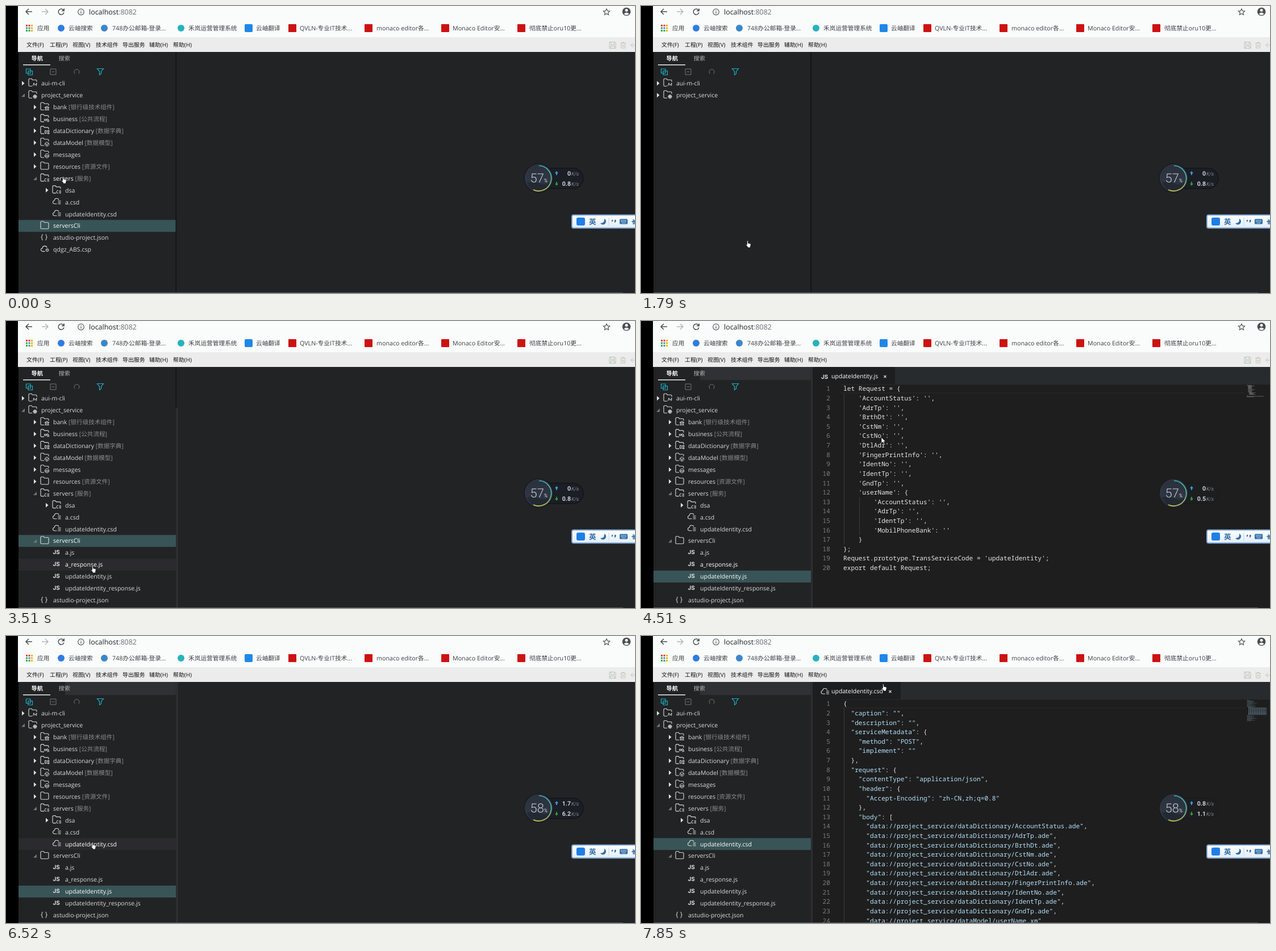
Write an HTML page that moves like this. It is 1107x506 px and loops after 8000 ms.

```html
<!DOCTYPE html>
<html lang="zh">
<head>
<meta charset="utf-8">
<style>
html,body{margin:0;width:100%;height:100%;overflow:hidden;background:#000}
svg{display:block;width:1107px;height:506px}
text{font-family:"Open Sans","Noto Sans CJK SC","Noto Sans CJK",sans-serif;white-space:pre;text-rendering:geometricPrecision}
.code{font-family:"Noto Sans Mono",monospace;font-weight:500}
.num{font-family:Roboto,sans-serif}
.js{font-family:Inter,sans-serif;font-weight:700}
</style>
</head>
<body>
<svg viewBox="0 0 1107 506">
<defs>
<linearGradient id="arc" x1="0" y1="0" x2="0" y2="1"><stop offset="0" stop-color="#3fb6c0"/><stop offset=".55" stop-color="#5fb89a"/><stop offset="1" stop-color="#c9c24e"/></linearGradient>
<linearGradient id="dial" x1="0" y1="0" x2="0" y2="1"><stop offset="0" stop-color="#2a313c"/><stop offset=".6" stop-color="#2e3643"/><stop offset="1" stop-color="#22272f"/></linearGradient>
<linearGradient id="ime" x1="0" y1="0" x2="0" y2="1"><stop offset="0" stop-color="#fff"/><stop offset="1" stop-color="#e3edf8"/></linearGradient>
</defs>
<g id="back"></g><g id="live"></g>
</svg>
<script>
const LOOP = 8000, TEAL = '#1bb3c4';
const $ = id => document.getElementById(id);
const rect = (x, y, w, h, fill, more = '') => `<rect x="${x}" y="${y}" width="${w}" height="${h}" fill="${fill}" ${more}/>`;
const text = (x, mid, s, size, fill, more = '') =>
  `<text x="${x}" y="${mid + size * .36}" font-size="${size}" fill="${fill}" ${more}>${s}</text>`;
const line = (d, color, w = 1, x = 0, y = 0, more = '') =>
  `<path d="${d}" transform="translate(${x} ${y})" fill="none" stroke="${color}" stroke-width="${w}" ${more}/>`;
const shape = (d, fill, x = 0, y = 0, more = '') => `<path d="${d}" transform="translate(${x} ${y})" fill="${fill}" ${more}/>`;
const circle = (x, y, r, fill, more = '') => `<circle cx="${x}" cy="${y}" r="${r}" fill="${fill}" ${more}/>`;
const at = (list, t) => list.filter(k => k[0] <= t).pop();

// Browser frame, menu bar and navigator header
function backdrop() {
  let s = rect(21, 0, 1086, 55, '#fafbfb') + rect(21, 55, 1086, 26, '#ececec') + rect(22, 81, 1085, 425, '#222325');
  s += line('M11 0H0M5-5L0 0L5 5', '#4a4d51', 1.5, 35, 10) + line('M0 0H11M6-5L11 0L6 5', '#b5b8bb', 1.5, 63, 10);
  s += line('M4.6-2.6A5 5 0 1 0 5 1M5.2-6V-2H1', '#4a4d51', 1.5, 97, 10.5);
  s += circle(132, 10.5, 5.3, 'none', 'stroke="#5f6368" stroke-width="1.2"') + line('M132 9.8V13.6M132 7.4V8.7', '#5f6368', 1.3);
  s += text(146, 10.5, 'localhost<tspan fill="#6a6e73">:8082</tspan>', 12.45, '#202124');
  s += line('M0-5.5L1.7-1.9L5.6-1.5L2.7 1.2L3.5 5L0 3L-3.5 5L-2.7 1.2L-5.6-1.5L-1.7-1.9Z', '#55585c', 1.2, 1057, 10.5);
  s += circle(1092, 10, 7.3, '#4a4d51') + circle(1092, 7.6, 2.5, '#fafbfb') + shape('M-4.6 4Q0-1 4.6 4Q0 8 -4.6 4Z', '#fafbfb', 1092, 10);
  const dots = ['#e34133', '#e34133', '#f0b400', '#34a853', '#4285f4', '#f0b400', '#34a853', '#34a853', '#f0b400'];
  dots.forEach((c, i) => s += rect(35 + i % 3 * 4.5, 33 + (i / 3 | 0) * 4.5, 3, 3, c));
  s += circle(97, 39, 6, '#2f7de0') + circle(173, 39, 6, '#3b86c8') + circle(308, 39, 6, '#27b2bd') + rect(420, 32, 14, 14, '#1f87e8', 'rx="2"');
  [497, 631, 766, 900].forEach(x => s += rect(x, 32, 14, 14, '#cc1212', 'rx="1"'));
  [[55, '应用'], [110, '云岫搜索'], [187, '748办公邮箱-登录...'], [321, '禾岚运营管理系统'], [440, '云岫翻译'], [517, 'QVLN-专业IT技术...'],
   [652, 'monaco editor各...'], [786, 'Monaco Editor安...'], [921, '彻底禁止oru10更...']].forEach(([x, n]) => s += text(x, 39, n, 10.7, '#3c4043'));
  [[36, '文件(F)'], [77, '工程(P)'], [117, '视图(V)'], [158, '技术组件'], [205, '导出服务'], [252, '辅助(H)'], [294, '帮助(H)']]
    .forEach(([x, n]) => s += text(x, 68, n, 9.9, '#111'));
  s += line('M-5.5-5.5H4L5.5-4V5.5H-5.5ZM-3-5V-1H3V-5M-3.5 5V1.5H3.5V5', '#b9c3b8', 1, 1067.5, 69);
  s += line('M-4.5-3.5H4.5M-1.5-3.5V-5H1.5V-3.5M-3.5-3.5V5H3.5V-3.5M-1-1V3M1-1V3', '#c9c3b8', 1, 1086, 69);
  s += line('M4-4L0 0L4 4M0 0H9', '#c4c4c4', 1, 1099.5, 69);
  return s;
}

function header(wide) {
  return (wide ? rect(104, 81, 195, 23, '#2f3134') : '')
    + text(44.5, 92, '导航', 10.2, '#fff', 'font-weight="600"') + text(92.5, 92, '搜索', 10.2, '#b4b4b4') + rect(30, 103, 48, 1.5, '#eee')
    + line('M-5.5-5H2V2.500H-5.500ZM-2-1.500H5.500V5.500H-2Z', TEAL, 1.2, 41, 116)
    + line('M-5-5H5V5H-5ZM-2.500 0H2.500', '#777', 1, 83, 116) + line('M-3 3.500A4.500 4.500 0 1 1 3 3.500', '#777', 1, 124.5, 116)
    + line('M-5.500-5.500H5.500L1.500-.5V3.500L-1.500 5.500V-.5Z', TEAL, 1.2, 166, 116);
}

// Small drawings laid over the corner of tree folders
const badges = {
  M: 'M8 13L9.500 8L11.500 12L14.500 8L14 13',
  gear: 'M9 11a2.500 2.500 0 1 0 5 0a2.500 2.500 0 1 0-5 0M11.500 7V15M7.500 11H15.500M8.700 8.200L14.300 13.800M14.300 8.200L8.700 13.800',
  bank: 'M7.500 9.500L11.500 7L15.500 9.500ZM9 10V13M11.500 10V13M14 10V13M7.500 13.500H15.500',
  flow: 'M7 9H10V11.500H7ZM12.500 8a1.500 1.500 0 1 0 .1 0M10 10.500H15M11.500 13H15V11',
  dict: 'M8 8H10.500V13H8ZM12.500 8H15.500V10H12.500ZM12.500 12H15.500V13.500H12.500Z',
  model: 'M11.500 7.500a3.500 3.500 0 1 0 .1 0M8.500 10L11.500 11.500L14.500 9.500M11.500 11.500V14',
  globe: 'M11.500 7a3.600 3.600 0 1 0 .1 0M8 10.500H15M9 13Q11.500 9 14 13',
  cloud: 'M10.500 13.500H8.500Q6.500 13 7.500 11Q8 8.500 10.500 9M12 9.500H15.500M12 11.500H15.500M12 13.500H15.500'
};
const FOLDER = 'M6.500 13.500H2Q.5 13.500.5 12V2Q.5.5 2 .5H5.500L7 2.500H13Q14.500 2.500 14.500 4V6';
const CLOUD = 'M8 11.500H4Q.5 11 1 8Q1.500 6 3.500 6Q4 2 7.500 2Q11 2 11.500 4.500M10 6.500H15M10 9H15M10 11.500H15';
function icon(kind, x, y) {
  const c = '#dcdcdc';
  if (kind == 'js') return text(x + 1, y + 7, 'JS', 10, c, 'class="js"');
  if (kind == 'json') return text(x + .5, y + 6.5, '{ }', 12, c);
  if (kind == 'csd') return line(CLOUD, c, 1.1, x, y);
  if (kind == 'csp') return line('M8 11.500H4Q.5 11 1 8Q1.500 6 3.500 6Q4 2 7.500 2Q11 2 11.500 5M12 7a2.300 2.300 0 1 0 .1 0M12 8.500V10', c, 1.1, x, y);
  if (kind == 'folder') return line('M.5 12V2Q.5.5 2 .5H5.500L7 2.500H13Q14.500 2.500 14.500 4V12Q14.500 13.500 13 13.500H2Q.5 13.500.5 12Z', c, 1.1, x, y);
  return line(FOLDER, c, 1.1, x, y) + line(badges[kind], c, 1, x, y);
}

// Rows: depth, icon, name, note, arrow (0 none, 1 closed, 2 open)
function rows(open, cli) {
  const list = [[0, 'M', 'aui-m-cli', '', 1], [0, 'gear', 'project_service', '', open ? 2 : 1]];
  if (!open) return list;
  list.push([1, 'bank', 'bank', '银行级技术组件', 1], [1, 'flow', 'business', '公共流程', 1], [1, 'dict', 'dataDictionary', '数据字典', 1],
    [1, 'model', 'dataModel', '数据模型', 1], [1, 'globe', 'messages', '', 1], [1, 'folder', 'resources', '资源文件', 1],
    [1, 'cloud', 'servers', '服务', 2], [2, 'cloud', 'dsa', '', 1], [2, 'csd', 'a.csd', '', 0], [2, 'csd', 'updateIdentity.csd', '', 0],
    [1, 'folder', 'serversCli', '', cli ? 2 : 0]);
  if (cli) ['a', 'a_response', 'updateIdentity', 'updateIdentity_response'].forEach(n => list.push([2, 'js', n + '.js', '', 0]));
  list.push([1, 'json', 'astudio-project.json', '', 0], [1, 'csp', 'qdgz_ABS.csp', '', 0]);
  return list;
}
function tree(t, picked, hover) {
  return rows(t < 1790 || t >= 2030, t >= 3240).map(([depth, kind, name, note, arrow], i) => {
    const y = 136.3 + i * 20.95, x = 21 * depth, on = name == picked;
    const lit = on || i == hover || name == 'a_response.js' && t >= 3510 && t < 5600;
    return (on ? rect(22, y - 10.5, 277, 21, '#385456') : i == hover && t > 1790 ? rect(22, y - 10.5, 277, 21, '#2b2b2f') : '')
      + (arrow == 1 ? shape('M0-4L4.500 0L0 4Z', '#e0e0e0', x + 28, y) : arrow ? shape('M0 3H6V-3Z', '#777', x + 27, y) : '')
      + icon(kind, x + 39.5, y - 8.5)
      + text(x + 62, y, name + (note && `<tspan fill="#8b8b8b"> [${note}]</tspan>`), 10.55, lit ? '#fff' : '#dadada');
  }).join('');
}

// Context menu: middle, label, icon, rule below
const UP = 'M-4 4H-5Q-8 4-8 1Q-8-2-5-2Q-4-7 0-7Q5-7 5-2Q8-2 8 1Q8 4 5 4H4M0 8V0M-3 3L0 0L3 3';
const items = [
  [219, '新建服务文件', 'M-7-7H0V0H-7ZM3-6H7M3-1H7M-7 3H7M-7 7H7', 1],
  [248, '新建服务', 'M-4 4H-5Q-8 4-8 1Q-8-2-5-2Q-4-7 0-7Q5-7 5-2Q8-2 8 1Q8 4 5 4M-4 0H4V3H-4ZM-4 4H4V7H-4Z', 1],
  [277, '新建文件夹', 'M-8 7V-7H-2L0-5H8V7ZM0-2V4M-3 1H3', 1],
  [306, '复制', 'M-7-4H4V7H-7ZM-4-4V-7H7V4H4M-4 0H1M-4 3H1', 0],
  [335, '粘贴', 'M-3 6H-7V-6H5V-3M-3-8H2V-4H-3ZM-2-1H4L7 2V8H-2ZM0 3H4M0 5.500H4', 0],
  [362, '在文件夹中搜索', 'M-1-7a6 6 0 1 0 .1 0M3 4L8 8', 1],
  [391, '资源部署', 'M0 3V-7M-4-3L0-7L4-3M-7 2V7H7V2', 0],
  [419, '提取通信字段', 'M-1-6H6V1H3M0-1H-6V6H1V2M-2 2L6-6M2-6H6V-2', 0],
  [447, '服务发布', UP, 0], [475, '服务部署', UP, 0],
  [502, '在资源管理器中显示', 'M-7 7V-6H-2L0-4H6V-1M-7 7L-4-1H8L5 7Z', 0]];
function menu(tip) {
  let s = rect(102.5, 203.5, 164, 310, '#f5f5f5', 'stroke="#8f9091"') + rect(131, 205, 1, 301, '#dedede');
  for (const [y, name, d, rule] of items) {
    if (Math.abs(tip - y) < 14) s += rect(104, y - 14, 161.5, 28, '#e6edf6', 'rx="2" stroke="#9cc0dc"');
    s += line(d, '#3a3a3a', 1.15, 118, y + 1) + text(139, y, name, 11.35, name == '粘贴' ? '#b5b5b5' : '#161616');
    if (rule) s += rect(133, y + 14, 132, 1, '#d6d6d6');
  }
  return s;
}

const fields = n => n.map(f => `'${f}': ''`);
const pad = (n, list) => list.map(s => ' '.repeat(n) + s);
const names = ['AccountStatus', 'AdrTp', 'BrthDt', 'CstNm', 'CstNo', 'DtlAdr', 'FingerPrintInfo', 'IdentNo', 'IdentTp', 'GndTp'];
const script = ['let Request = {', ...pad(4, fields(names)).map(s => s + ','), "    'userName': {",
  ...pad(8, fields(['AccountStatus', 'AdrTp', 'IdentTp', 'MobilPhoneBank'])).map((s, i) => s + (i < 3 ? ',' : '')),
  '    }', '};', "Request.prototype.TransServiceCode = 'updateIdentity';", 'export default Request;'];
const service = ['{', '  "caption": "",', '  "description": "",', '  "serviceMetadata": {', '    "method": "POST",', '    "implement": ""', '  },',
  '  "request": {', '    "contentType": "application/json",', '    "header": {', '      "Accept-Encoding": "zh-CN,zh;q=0.8"', '    },', '    "body": [',
  ...names.map(n => `      "data://project_service/dataDictionary/${n}.ade",`), '      "data://project_service/dataModel/userName.xm"'];

function editor(js) {
  const code = js ? script : service, end = js ? 447 : 457, guide = (x, a, b) => rect(x, 111 + a * 16.62, 1, (b - a) * 16.62, '#3c3c3c');
  let s = rect(302, 81, 805, 31, '#282b2e') + rect(302, 81, end - 302, 31, '#1d1e20') + rect(302, 112, 805, 394, '#1e1e1e');
  s += js ? text(317, 98, 'JS', 10, '#ddd', 'class="js"') : line(CLOUD, '#ddd', 1.1, 316, 90.5);
  s += text(335, 97.5, 'updateIdentity.' + (js ? 'js' : 'csd'), 10.55, '#fff') + line('M-2-2L2 2M2-2L-2 2', '#ddd', 1.1, js ? 429.5 : 438.5, 98);
  s += rect(352, 111.5, 711, 1, '#292929') + rect(352, 126.5, 711, 1, '#2b2b2b');
  s += js ? guide(357, 1, 17) + guide(384, 12, 16) : guide(357, 1, 24);
  code.forEach((l, i) => {
    const y = 119.3 + i * 16.62;
    s += text(333, y, i + 1, 11.2, '#7c7c7c', 'class="code" text-anchor="end"');
    s += text(356, y, js ? l : l.replace(/"[^"]*"/g, '<tspan fill="#b2e0f8">$&</tspan>'), 11.2, '#e6e6e6', 'class="code"');
    const ind = l.search(/\S/);
    if (js) s += rect(1066 + ind * .55, 113 + i * 1.08, (l.length - ind) * .55, .7, '#777');
  });
  if (!js) for (let i = 0; i < 34; i++) {
    const mid = i > 11 && i < 24, w = mid ? 32 : 5 + i * 7 % 12, x = 1066 + (mid ? 3 : i % 3);
    s += line(`M${x} ${113.4 + i * 1.1}h${w}`, mid ? '#5f7885' : '#52646e', .8, 0, 0, 'stroke-dasharray="2.2 .9"');
  }
  return s;
}

function meter(load, up, down, dim) {
  const row = (y, v) => text(994, y, v, 10.6, '#d0d3d8', 'class="num" font-weight="600" text-anchor="end"')
    + text(995, y + .7, 'K/s', 8.8, '#85898f', 'class="num" font-style="italic"');
  return rect(935, 286, 81, 36, '#1b1e25', `rx="18" stroke="#13151a" stroke-width="1.500" ${dim ? 'opacity=".3"' : ''}`)
    + circle(937.5, 303.5, 26, '#171a1f', dim ? 'opacity=".4"' : '') + circle(937.5, 303.5, 24, 'url(#dial)', 'stroke="#353d49"')
    + shape('M-20 8Q-10 4 0 9Q10 14 20 8Q12 22 0 22Q-12 22-20 8Z', '#222932', 937.5, 303.5)
    + line('M938 281.500A22.300 22.300 0 1 1 928 324', 'url(#arc)', 1.7)
    + text(922.5, 303.5, load, 22, '#c3c8cf', 'class="num" font-weight="300"') + text(946.5, 308, '%', 9.5, '#c3c8cf', 'class="num" font-style="italic"')
    + shape('M0-4L3 0H1V3H-1V0H-3Z', '#3d9be0', 969, 295) + shape('M0 4L3 0H1V-3H-1V0H-3Z', '#2f9a45', 969, 313)
    + row(295, up) + row(313.5, down);
}
function imeBar() {
  const c = '#2f6ea8';
  return rect(996, 368.5, 120, 23, 'url(#ime)', 'rx="3" stroke="#7fa8d6" stroke-width="2"') + rect(1004, 373, 15, 14, '#1f7fe6', 'rx="3"')
    + text(1026, 380, '英', 12.5, c, 'font-weight="600"') + shape('M2-5A5.500 5.500 0 1 1-5 3Q3 3 2-5Z', c, 1051, 380)
    + rect(1060.5, 373, 1, 14, '#c4d4e6') + shape('M-3-3h2v2l-2 2ZM2-3h2.500v3l-2.500 2.500Z', c, 1069, 380)
    + rect(1080, 375.5, 14, 9, c, 'rx="1.500"') + line('M2 2.500H12M2 4.500H12M4 7H10', '#e8f1fa', 1, 1080, 375.5, 'stroke-dasharray="1.500 .8"')
    + line('M0 0H7M3-4V5M5-3V5', c, 1.4, 1101, 380);
}

// Pointer: time, x, y
const path = [[0, 102, 307], [150, 108, 310], [270, 124, 318], [420, 132, 324], [690, 146, 350], [810, 163, 380], [960, 180, 405], [1080, 189, 420],
  [2730, 172, 412], [2850, 142, 399], [3000, 118, 393], [3390, 136, 416], [3510, 154, 438], [3810, 153, 456],
  [4390, 260, 340], [4510, 427, 211], [4660, 440, 170], [4780, 440, 140], [4930, 436, 118], [5050, 433, 108], [5200, 431, 102], [5320, 430, 100],
  [5590, 400, 130], [5710, 350, 185], [5860, 285, 255], [5980, 225, 315], [6130, 185, 350], [6250, 165, 364], [6400, 154, 370],
  [7160, 190, 335], [7310, 260, 255], [7430, 330, 180], [7580, 385, 125], [7700, 415, 100], [7850, 428, 91]];
const picks = [[0, 'serversCli'], [1790, ''], [2030, 'serversCli'], [3960, 'updateIdentity.js'], [6760, 'updateIdentity.csd']];
const loads = [[0, 57, '0', '0.8'], [2030, 57, '0.2', '1.1'], [3000, 57, '0', '0.8'], [3960, 57, '0', '0.5'], [4930, 57, '0.4', '1.6'],
  [5980, 58, '1.7', '6.2'], [6760, 58, '0.9', '2.4'], [7700, 58, '0.8', '1.1']];

function pointer(x, y, arrow) {
  const d = arrow ? 'M-4-6V4.500L-1.500 2.300L.2 6L2 5.200L.4 1.700H3.500Z'
    : 'M-2.500 0V-5.500Q-1.500-7-.6-5.500V-2L3.500-1Q4.500-.5 4.300 1L3.500 4V6H-1.500V4.500L-4.500 1Q-4.500-.5-2.500 1Z';
  return shape(d, '#fff', x, y, 'stroke="#111" stroke-width=".8"');
}

function scene(t) {
  const [, x, y] = at(path, t), tip = y - 6, hasMenu = t >= 150 && t < 1790;
  const file = t >= 4390 && t < 5470 ? 'js' : t >= 7040 ? 'csd' : '';
  const hover = !hasMenu && x < 299 ? Math.round((tip - 136.3) / 20.95) : -1;
  const split = t < 2030 ? 506 : t < 4390 ? 153 : 81;
  const [, load, up, down] = at(loads, t);
  return header(t >= 4390) + tree(t, at(picks, t)[1], hover)
    + rect(298.5, 81, 1.5, split - 81, '#121314') + rect(299.5, split, 3, 506 - split, '#303134')
    + (file && editor(file == 'js')) + rect(22, 505, 1064, 1, '#55585a')
    + meter(load, up, down, file) + imeBar() + (hasMenu ? menu(tip) : '')
    + pointer(x, y, file == 'js' && x > 302 && y > 112);
}

$('back').innerHTML = backdrop();
let shown = '';
function tick() {
  const s = scene(performance.now() % LOOP);
  if (s != shown) $('live').innerHTML = shown = s;
  requestAnimationFrame(tick);
}
tick();
</script>
</body>
</html>
```
